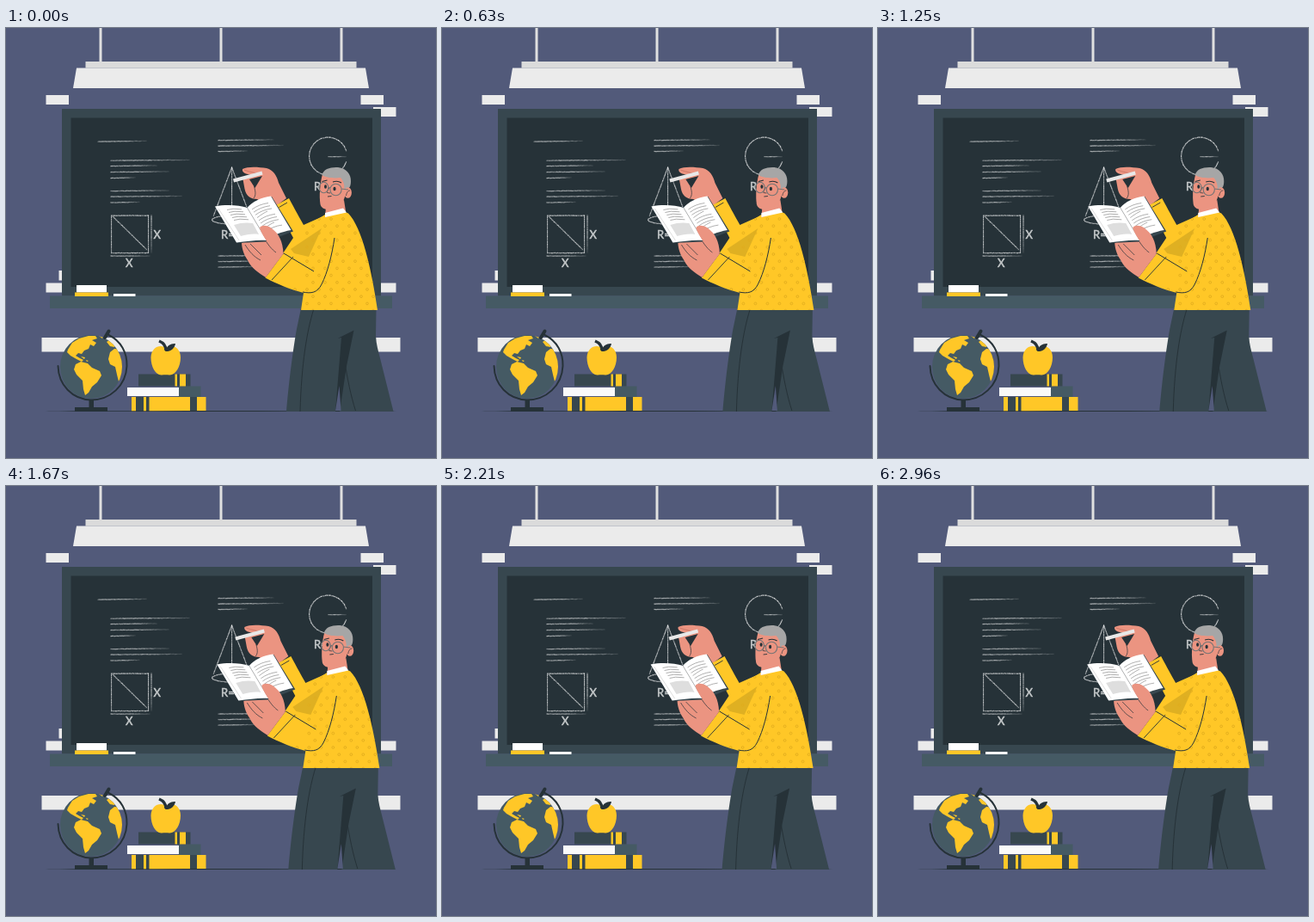
Animation, 500 px wide and 500 px high, one loop 3000 ms. Source, as an HTML page with a canvas:

```html
<!DOCTYPE html>
<html lang="en">
<head>
<meta charset="utf-8">
<title>Geometry lesson</title>
<style>
html, body { margin: 0; width: 100%; height: 100%; overflow: hidden; background: #525a7a; }
canvas { display: block; width: 500px; height: 500px; }
</style>
</head>
<body>
<canvas id="stage" width="500" height="500"></canvas>
<script>
const WALL = '#525a7a', DARK = '#263238', SLATE = '#37474f', TEAL = '#455a64';
const LIGHT = '#ebebeb', YELLOW = '#ffc727', SKIN = '#eb9481', WHITE = '#fafafa';

const ctx = document.getElementById('stage').getContext('2d');
const room = document.createElement('canvas');
room.width = room.height = 500;
let g = room.getContext('2d');

let seed = 7;
const rnd = () => (seed = (seed * 16807) % 2147483647) / 2147483647;

function box(x1, y1, x2, y2, color) {
  g.fillStyle = color;
  g.fillRect(x1, y1, x2 - x1, y2 - y1);
}
function fill(d, color) {
  g.fillStyle = color;
  g.fill(new Path2D(d));
}
function line(d, color = DARK, width = 1) {
  g.strokeStyle = color;
  g.lineWidth = width;
  g.stroke(new Path2D(d));
}
function disc(x, y, rx, ry, color) {
  g.fillStyle = color;
  g.beginPath();
  g.ellipse(x, y, rx, ry, 0, 0, 7);
  g.fill();
}
function ring(x, y, rx, ry, color, width = 1) {
  g.strokeStyle = color;
  g.lineWidth = width;
  g.beginPath();
  g.ellipse(x, y, rx, ry, 0, 0, 7);
  g.stroke();
}

// Grainy stroke that thins out towards its end
function chalk(x1, y1, x2, y2, fade = true) {
  const n = Math.hypot(x2 - x1, y2 - y1);
  g.fillStyle = '#fff';
  for (let i = 0; i < n; i++) {
    const k = i / n;
    const thin = fade && k > 0.5 ? 1 - (k - 0.5) * 1.6 : 1;
    g.globalAlpha = (0.35 + 0.35 * rnd()) * thin;
    g.fillRect(x1 + (x2 - x1) * k - 0.5, y1 + (y2 - y1) * k - 0.5 + (rnd() - 0.5) * 0.4, 1.1, 1.2);
  }
  g.globalAlpha = 1;
}
function chalkArc(x, y, rx, ry, from, to) {
  const steps = 24;
  const at = i => from + (to - from) * i / steps;
  for (let i = 0; i < steps; i++) {
    const a = at(i), b = at(i + 1);
    chalk(x + rx * Math.cos(a), y + ry * Math.sin(a), x + rx * Math.cos(b), y + ry * Math.sin(b), false);
  }
}
function letter(s, x, y) {
  g.fillStyle = g.strokeStyle = '#c6cacb';
  g.lineWidth = 0.5;
  g.font = '13px Lato, "Open Sans", sans-serif';
  g.fillText(s, x, y);
  g.strokeText(s, x, y);
}

function drawBoard() {
  box(46.5, 78, 73, 89, LIGHT);
  box(412.5, 78, 439, 89, LIGHT);
  box(427, 92, 453.5, 103, LIGHT);
  box(61.5, 282, 68, 293.5, LIGHT);
  box(46.5, 296.5, 68, 307.5, LIGHT);
  box(430, 296.5, 453.5, 307.5, LIGHT);
  box(41.5, 360, 458.5, 376.5, LIGHT);

  for (const x of [110, 250, 390]) box(x - 1.5, 0, x + 1.5, 39, '#e0e0e0');
  box(92.5, 39, 407.5, 46.5, '#dbdbdb');
  fill('M82 46.5H418L422 70H78Z', LIGHT);

  box(65, 94, 436, 311.5, SLATE);
  box(75.5, 104.5, 426, 301, DARK);
  box(51, 311.5, 449, 326, TEAL);
  box(82, 299, 117, 307.5, '#fff');
  box(80, 307.5, 119, 312, YELLOW);
  box(125, 309, 150.5, 312, '#fff');

  const rows = [
    [107, 132, 163], [122, 154, 213], [122, 160.5, 175], [122, 167.5, 189], [122, 174.5, 150],
    [122, 189.5, 189], [122, 196, 204], [122, 203, 155],
    [247, 130.5, 311], [247, 137, 322], [247, 143.5, 280],
    [247, 265, 310], [247, 271.5, 300], [247, 278, 290]
  ];
  for (const [x, y, end] of rows) chalk(x, y, end, y - 0.7);

  chalk(122.5, 218, 166, 218, false);
  chalk(122.5, 218, 122.5, 262, false);
  chalk(165.5, 218, 165.5, 262, false);
  chalk(122.5, 261.5, 166, 261.5, false);
  chalk(124, 219, 164, 258, false);
  chalk(169, 218, 169, 262);
  chalk(122, 265, 168, 265);
  letter('X', 171.5, 244.5);
  letter('X', 139, 277.5);

  chalk(262.5, 162, 241, 219, false);
  chalk(262.5, 162, 284, 219, false);
  chalk(262.5, 162, 262.5, 222, false);
  chalkArc(262.5, 223, 23, 5, 0, Math.PI * 2);
  letter('R=', 250, 244.5);

  chalkArc(374.5, 149, 22, 22, 0.3, 6);
  chalk(375, 149.5, 396, 149.5);
  letter('R=', 358, 188.5);
}

function drawGlobe() {
  disc(99, 394, 36, 37, TEAL);
  g.save();
  g.beginPath();
  g.ellipse(99, 394, 36, 37, 0, 0, 7);
  g.clip();
  fill('M72 374L77 366L85 361L96 358L104 358L106 361L100 363L105 366L102 370L98 368L96 373L91 375L88 379L84 378L81 381L86 384L90 386L88 388L82 385L75 381L71 377Z', YELLOW);
  fill('M81 391L87 388L95 390L100 395L109 399L111 404L106 412L100 417L96 424L92 427L90 420L89 410L82 403L79 397Z', YELLOW);
  fill('M121 377L126 373L136 374V410L131 411L129 403L127 394L121 391L119 385Z', YELLOW);
  fill('M117 365L123 361L128 366L126 371L121 370Z', YELLOW);
  fill('M87 382L92 383L91 385ZM93 386L96 387L94 388ZM108 358L114 357L112 361Z', YELLOW);
  g.restore();
  g.lineCap = 'round';
  line('M119.5 357C134 364 141 378 140.5 393C139.5 416 121 432.5 99 432.5C77 432 61 415 60.5 393', DARK, 2);
  line('M115 360L119.5 352.5', DARK, 4);
  g.lineCap = 'butt';
  box(96.5, 433, 102, 442, DARK);
  box(80, 441, 118, 446, DARK);
}

function drawBooks() {
  box(146, 429, 232.5, 446, YELLOW);
  box(151, 429, 160, 446, SLATE);
  box(163, 429, 166.5, 446, SLATE);
  box(214, 429, 222, 446, SLATE);
  box(200, 416.5, 226.5, 429, TEAL);
  box(141, 418, 201, 428, WHITE);
  box(154, 402.5, 214.5, 416.5, SLATE);
  box(196.5, 402.5, 199, 416.5, YELLOW);
  box(202, 402.5, 209, 416.5, YELLOW);

  fill('M186 372.5C180 367 169 371 168.500 383C168.500 394 174 404 181 403.500C184 403 187 403 190 403.500C197 404 203 394 203 383C203 371 192 367 186 372.5Z', YELLOW);
  line('M186 375C186 369 183 366 178 364', DARK, 3.5);
  fill('M185 376C187 369 192 366.500 197 367C196 373 191 376.500 185 376Z', DARK);
}

function drawRoom() {
  box(0, 0, 500, 500, WALL);
  drawBoard();
  drawGlobe();
  drawBooks();
  disc(250, 445.6, 204, 0.5, DARK);
}

function drawLegs() {
  fill('M343 326H430.500L430 358C430.500 368 433 376 435 384L450.500 446H326C329 410 334 372 338 350Z', SLATE);
  fill('M404.500 351.500L385.500 361L390 360L383 446H388L396 393Z', DARK);
  fill('M387.500 416L383 445H389.500Z', WALL);
  line('M357.500 328C350 352 343.500 390 342 446');
  line('M393.500 386C397 408 401 428 406.500 445');
}

function drawBackArm() {
  fill('M275 164C281 160.500 294 161.500 303 163C311 165 315 172 317 180L326 198L310 210L292 199C284 199 279 195 277.500 187L275.500 176L286 171C279 170 274 168 275 164Z', SKIN);
  fill('M283 176L298 172L289.500 186Z', DARK);
  line('M288.500 184C290 190 291 194 288 198', DARK, 0.7);
  line('M277 165C284 168 291 168 297 171', '#b96456', 0.6);
  line('M264.500 177.500L298 168.500', '#e8e8e8', 4.2);
  fill('M314 206L329 198C336 211 341 220 346 229L373 217L382 244L352 268L322 262L334 244Z', YELLOW);
  line('M317.500 208.500L327 203', DARK, 0.9);
}

const SHIRT = 'M371 217C380 212 392 212 398 215.500C414 232 425 280 432 328H343L346 308C330 304 314 297 301.500 290.500L322 263L335 250L350 230Z';

function drawShirt() {
  fill(SHIRT, YELLOW);
  fill('M367 233L331 257L335 262L352 266Z', '#dfb022');
  g.save();
  g.clip(new Path2D(SHIRT));
  for (let r = 0; r < 14; r++) {
    for (let x = 336 + (r % 2) * 7; x < 432; x += 14) {
      if (x < 345 && r < 10) continue;
      ring(x, 222 + r * 8.2, 1.4, 1.4, '#e0ac1f', 0.9);
    }
  }
  g.restore();
  line('M382 244C379 264 374 284 367 298C362 308 355 309 345 307');
  line('M323 262L358 283');
  line('M334 266L309 293', DARK, 0.9);
}

function drawHead() {
  fill('M372 208L393 200L395 213L371 220Z', SKIN);
  fill('M371 215L392 209.500L396 214.500L371 220Z', '#fff');
  fill('M368 170C365 181 364 196 365.500 205C367 212 377 212.500 384 209C391 205 394 200 395 190L394 169Z', SKIN);
  fill('M367.500 171C369 164 377 161.500 386 162C396 163 401 170 401 178C401 184 399.500 186 397 187L393.500 187C393.500 181 392 177 389 174C381 175 372 174 367.500 171Z', '#a6a6a6');
  disc(397.500, 191.500, 4.4, 6.3, SKIN);
  line('M395.500 195C396 191 398 189 400 189', DARK, 0.7);
  line('M367.500 178.500L373.500 177M380 179C384 177.500 387 178 390 180', DARK, 1.1);
  disc(371.5, 184.500, 1.5, 2.2, DARK);
  disc(382, 187, 1.6, 2.3, DARK);
  line('M376.500 185C374.500 188 373 190 373.500 191.500L377 192', DARK, 0.7);
  line('M374 196L378.500 195.500', DARK, 0.9);
  ring(369.5, 185.5, 5.3, 6.2, '#757575', 1.1);
  ring(383.500, 188, 6.6, 6.8, '#757575', 1.1);
  line('M374.500 185L377 186M390 187L398 188', '#757575', 1.1);
}

function drawBook() {
  fill('M274 250C279 247 290 246 301 245L322 263L302 290C294 285 285 279 281 270C277 264 274.500 258 274 250Z', SKIN);
  line('M278 252C283 260 288 266 296 270M284 251L297 264', DARK, 0.7);

  fill('M243 208L268.500 250L303 248.500L334 236.500L309 196L281 208Z', SLATE);
  fill('M243 207.500C256 205 271 206 280.500 209L303 247C293 246 281 248 268 249.500Z', '#fff');
  fill('M280.500 209C286 202 297 197 308 195.500L331.500 235C320 237 310 241 303 247Z', '#fff');
  line('M280.500 209L303 246.500', '#a6a6a6', 0.7);
  line('M247 210L271 247', '#cfcfcf', 0.7);
  fill('M265 229C273 226 281 226 287 227L294 240C287 239 280 240 273 242Z', '#dedede');

  for (let i = 0; i < 5; i++) {
    const x = 257 + i * 2, y = 211.500 + i * 3;
    line(`M${x} ${y}l7 -1.300l10 .6`, '#8a8a8a', 0.7);
  }
  for (let i = 0; i < 9; i++) {
    const x = 286 + i * 2, y = 211 + i * 3.2;
    line(`M${x} ${y}q8 -6 ${i % 4 === 3 ? 12 : 19} -7.500`, '#8f8f8f', 0.7);
  }

  fill('M295 232C298 228.500 304 229.500 309 233C317 239 322 248 322.500 262L315 272L305 253C303 245 296 239 295 232Z', SKIN);
  line('M303 249C307 255 311 259 314 261', DARK, 0.7);
}

function drawTeacher() {
  drawBackArm();
  drawLegs();
  drawShirt();
  drawHead();
  drawBook();
}

// Sideways shake: ten equal linear steps per loop
const SHAKE = [0, -1, 2, -4, 4, -4, 4, -4, 2, -1, 0];
const LOOP = 3000, LEAD = 60;

function shakeAt(t) {
  const p = ((t + LEAD) % LOOP) / LOOP * 10;
  const i = Math.floor(p);
  return SHAKE[i] + (SHAKE[i + 1] - SHAKE[i]) * (p - i);
}

drawRoom();
g = ctx;
let start;
function frame(now) {
  if (start === undefined) start = now;
  ctx.drawImage(room, 0, 0);
  ctx.save();
  ctx.translate(shakeAt(now - start) + 0.2, 0);
  drawTeacher();
  ctx.restore();
  requestAnimationFrame(frame);
}
requestAnimationFrame(frame);
</script>
</body>
</html>
```
